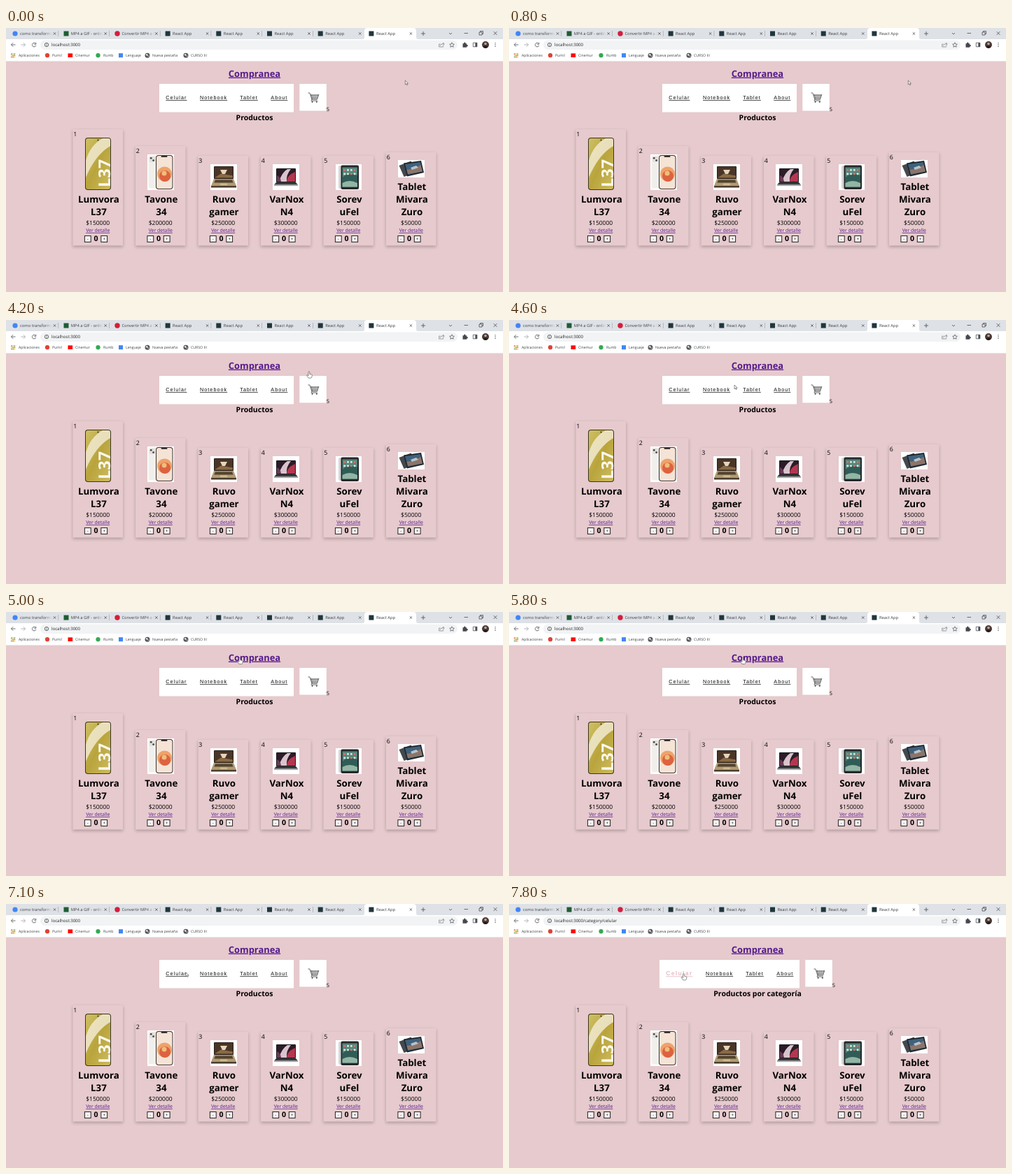
Write an HTML page that moves like this. It is 710x378 px and loops after 8000 ms.

```html
<!DOCTYPE html>
<html lang="es">
<head>
<meta charset="utf-8">
<title>Tienda</title>
<style>
  html, body { margin: 0; width: 100%; height: 100%; overflow: hidden; background: #e6cacd; }
  svg { display: block; width: 710px; height: 378px; text-rendering: geometricPrecision; }
  text { font-family: "Open Sans", "Noto Sans", sans-serif; white-space: pre; }
  .mid { text-anchor: middle; }
  .bold { font-weight: 700; }
  .link { fill: #551a8b; text-decoration: underline; }
  .link.active { fill: #e00; }
  .nav { font: 7.2px "Liberation Sans", Arial, sans-serif; letter-spacing: .146em; text-decoration: underline; }
  .nav.hover { font-size: 8.64px; font-weight: 700; fill: #e6bcc4; }
  .card { fill: #e6cacd; filter: drop-shadow(0 2px 2px rgba(0, 0, 0, .24)); }
  .line { fill: none; stroke: #4a4d51; stroke-width: .8; }
</style>
</head>
<body>
<svg id="stage" viewBox="0 0 710 378" xmlns="http://www.w3.org/2000/svg"></svg>
<script>
const LOOP = 8000;
const text = (x, y, size, s, attrs = '') => `<text x="${x}" y="${y}" font-size="${size}" ${attrs}>${s}</text>`;
const rect = (x, y, w, h, fill, attrs = '') => `<rect x="${x}" y="${y}" width="${w}" height="${h}" fill="${fill}" ${attrs}/>`;
const dot = (x, y, r, fill) => `<circle cx="${x}" cy="${y}" r="${r}" fill="${fill}"/>`;
const path = (d, attrs = 'class="line"') => `<path d="${d}" ${attrs}/>`;
const fill = c => `fill="${c}"`;
const square = (x, y, c) => rect(x - 3.5, y - 3.5, 7, 7, c);
const cross = (x, y, r) => path(`M${x - r} ${y - r}l${2 * r} ${2 * r}m0 ${-2 * r}l${-2 * r} ${2 * r}`);

// Browser window
function tabs() {
  const names = ['como transforma', 'MP4 a GIF - onlin', 'Convertir MP4 a G', ...Array(5).fill('React App')];
  const icons = [dot(13, 8, 3.6, '#4285f4'), square(86, 8, '#1f5c33'), dot(159, 8, 3.7, '#d21f3c')];
  let out = rect(0, 0, 710, 16, '#dee1e6') +
    path('M509 16q3 0 3-3V4q0-4 4-4H582q4 0 4 4v9q0 3 3 3z', fill('#fff'));
  names.forEach((name, i) => {
    const x = 13 + i * 72.7;
    out += (icons[i] || square(x, 8, '#20363b')) +
      text(x + 7, 10, 5.8, name, fill('#3c4043'));
    if (i < 3) out += rect(x + 42, 2, 11, 12, 'url(#fade)') + rect(x + 53, 2, 5, 12, '#dee1e6');
    out += cross(x + 56.5, 8, 1.7);
    if (i < 6) out += rect(x + 61.5, 4, .6, 8, '#9a9da2');
  });
  return out + path('M593 8h6m-3-3v6') + path('M633 7l2 2 2-2') +
    path('M654.5 7.5h5.5') + path('M676 6h4v4h-4zM677.5 6V4.5h4v4H680') + cross(699, 7.5, 2.4);
}

function toolbar() {
  return rect(0, 16, 710, 31.5, '#fff') + rect(49, 17.5, 596, 13.5, '#f1f3f4', 'rx="6.7"') +
    path('M13.5 24H7.5m2.7-2.8L7.4 24l2.8 2.8') +
    path('M21.5 24h6m-2.7-2.8 2.8 2.8-2.8 2.8', 'fill="none" stroke="#a9acb0" stroke-width=".9"') +
    path('M42.2 22.2A2.8 2.8 0 1 0 42.8 25m0-4.2v2.5h-2.5') +
    `<circle cx="58" cy="24" r="2.7" class="line"/>` + path('M58 23.6v2M58 22.2v.7') +
    '<text id="url" x="65" y="26.2" font-size="6.1" fill="#202124"></text>' +
    path('M620.5 23h-1.8v4h6v-1.2M620.3 25.5q.6-3 4.2-3v-1.5l1.8 2-1.8 2v-1.3', 'fill="none" stroke="#74777b" stroke-width=".7"') +
    path('M637 20.8l1 2.2 2.4.3-1.8 1.6.5 2.4-2.1-1.2-2.1 1.2.5-2.4-1.8-1.6 2.4-.3z', 'fill="none" stroke="#4a4d51" stroke-width=".7"') +
    path('M652.5 22.3h1.7a1.2 1.2 0 1 1 2.2 0h1.7v1.8a1.2 1.2 0 1 1 0 2.2v1.4h-5.6z', fill('#45484c')) +
    path('M667.3 21.2h5.6v5.6h-5.6z') + rect(670.4, 21.2, 2.5, 5.6, '#45484c') +
    dot(685, 24, 5, '#4a3a36') + dot(685, 22.6, 1.8, '#c5a193') + path('M681.7 27.6a3.4 3 0 0 1 6.6 0a5 5 0 0 1-6.6 0z', fill('#1d1b20')) +
    [21.6, 24, 26.4].map(y => dot(699, y, .7, '#4a4d51')).join('');
}

function bookmarks() {
  const globe = x => dot(x, 39.2, 3.5, '#54585d') +
    path(`M${x - 2.5} 38.2q2-2.6 3 0t-1.2 1.5zM${x + .6} 41.2l1.8-2 .1 1.6z`, fill('#e4e6e8'));
  const colours = ['#ea4335', '#fbbc04', '#34a853'];
  let out = '';
  for (let i = 0; i < 9; i++)
    out += rect(7.2 + i % 3 * 2.2, 36.4 + (i / 3 | 0) * 2.2, 1.5, 1.5, colours[(i + (i / 3 | 0)) % 3]);
  out += dot(59, 39.2, 3.1, '#db4437') + rect(88.5, 36.4, 6.6, 5.6, '#f00') + dot(131.5, 39.2, 3.1, '#34a853') +
    rect(161, 36.2, 6, 6, '#4285f4') + globe(202) + globe(257);
  const labels = [[18, 'Aplicaciones'], [66, 'Pumil'], [99, 'Cinemur'], [139, 'Rumb'], [171, 'Lenguaje'],
    [209, 'Nueva pestaña'], [264, 'CURSO III']];
  return out + labels.map(([x, s]) => text(x, 41.2, 5.2, s, fill('#3c4043'))).join('');
}

// Product pictures, one per card
const pictures = [
  () => rect(113, 157, 37, 75, '#3a3522', 'rx="4"') + rect(114, 158, 35, 73, 'url(#gold)', 'rx="3.2"') +
    path('M114 190q6-22 24-32h8q3 0 3 3v8q-21 12-35 45z', 'fill="#f1ead0" opacity=".85"') +
    dot(131.5, 160.6, 1, '#222') +
    text(0, 0, 23.5, 'L37', 'class="bold" fill="#fbf8ec" transform="translate(149 228) rotate(-90)"'),
  () => rect(202, 181, 38, 51, '#fff') + rect(203.5, 182.5, 17, 47, '#f1efec', 'rx="3"') +
    rect(205, 184, 8, 8, '#e2dfdb', 'rx="2"') + dot(207.2, 186.3, 1.4, '#444') + dot(210.6, 189.6, 1.4, '#444') +
    rect(214, 182, 24.5, 49, '#3a3532', 'rx="4"') + rect(215, 183, 22.5, 47, '#f5e3d6', 'rx="3.2"') +
    dot(226.5, 209, 10.5, '#eda36a') + dot(227, 212, 8, '#dd6240') + dot(226, 208, 3.5, '#f0bd79') +
    rect(221.5, 183, 9, 2, '#3a3532', 'rx="1"'),
  () => rect(292, 195, 38, 37, '#fff') + rect(297, 198, 28, 18, '#2b211b', 'rx="1"') +
    rect(298, 199, 26, 15.5, '#4a3527') + path('M298 214.5l9-6 17 3v3z', fill('#8a6a45')) +
    path('M306 203h10l-3 6h-4z', fill('#e4d6bd')) +
    path('M297 216h28l4 10H293z', fill('#b29a72')) + path('M299 217.5h24l1.6 4h-27.2z', fill('#51432f')) +
    path('M293 226h36v2.5h-36z', fill('#4b3d2d')) + rect(306, 222.5, 10, 2.5, '#cdb98f'),
  () => rect(381, 195, 38, 37, '#fff') + rect(386, 201, 28, 20, '#1b181c', 'rx="1"') +
    rect(387, 202, 26, 18, '#2b1c28') + path('M390 220q4-13 12-18h5q-7 8-6 18z', fill('#d9c3cd')) +
    path('M401 220q0-9 12-14v14z', fill('#b5364f')) + path('M387 220v-9q5 2 6 9z', fill('#6c3a58')) +
    path('M386 221h28l3 3.5h-34z', fill('#3a383b')) + rect(383, 224.5, 34, 1.6, '#a5a5a9'),
  () => rect(471, 195, 37, 37, '#fff') + rect(475, 197, 12, 33, '#d6d6d9', 'rx="2"') +
    rect(478.5, 196.5, 25.5, 34.5, '#25282b', 'rx="2"') +
    rect(480.5, 199.5, 21.5, 28, '#56857c') + path('M480.5 214q9-8 21.5-3v16.5h-21.5z', fill('#2f5c56')) +
    path('M480.5 222q10-6 21.5 0v5.5h-21.5z', fill('#93b5a4')) +
    [0, 1, 2, 3, 4, 5, 6, 7].map(i => rect(482.3 + i % 4 * 4.8, 202 + (i / 4 | 0) * 5.5, 2.8, 2.8, i % 3 ? '#d8e6e0' : '#d47758', 'rx=".7"')).join(''),
  () => rect(560, 189, 38, 25, '#fff') + path('M561.5 197l17-6.5 8 16.5-18 6z', fill('#44484e')) +
    path('M568 193.5l25-3.5 4 17-24 5.5z', fill('#202429')) +
    path('M570 195l21.8-3 3.2 13.6-20.8 4.7z', fill('#40617c')) + path('M574 209l-1.5-6q11-1 20-7l2.3 9.4z', fill('#8d7468')) +
    path('M578 200l8-3 3 3-9 3z', fill('#b6c4cc'))
];

const products = [
  [145, 150000, 'Lumvora', 'L37'], [169, 200000, 'Tavone', '34'], [183, 250000, 'Ruvo', 'gamer'],
  [183, 300000, 'VarNox', 'N4'], [183, 150000, 'Sorev', 'uFel'], [178, 50000, 'Tablet', 'Mivara', 'Zuro']
];

function button(x, sign) {
  return rect(x - 4.4, 297.6, 8.8, 8.8, '#f8f4f4', 'stroke="#222" stroke-width="1"') +
    text(x, 304, 6, sign, 'class="mid"');
}

function card([top, price, ...name], i) {
  const x = 95.5 + i * 89.5, c = x + 35.7;
  return rect(x, top, 71.5, 311.5 - top, '', 'class="card"') +
    text(x + .8, top + 9.7, 8.8, i + 1) + pictures[i]() +
    name.map((s, n) => text(c + 1.2, 268.4 - (name.length - 1 - n) * 18.4, 13.3, s, 'class="mid bold"')).join('') +
    text(c, 281.7, 8.5, '$' + price, 'class="mid"') +
    text(c, 292, 6.9, 'Ver detalle', 'class="mid link"') +
    button(c - 14.4, '-') + text(c - 2.6, 305.4, 10.5, 0, 'class="mid bold"') + button(c + 9, '+');
}

function header() {
  const cart = path('M434.6 95h12l-2.4 6.8h-7.6z', fill('#8b8b8d')) +
    path('M431.5 93h2.4l3 9.2h7.6l2.4-7.2M436.8 102.2l-.8 1.9h9', 'fill="none" stroke="#5c5c5f" stroke-width=".9"') +
    path('M435.5 98.3h10M438.6 95l1 6.8M441.3 95v6.8M444 95l-.8 6.8', 'stroke="#e4e4e4" stroke-width=".5"') +
    dot(437.6, 105.8, 1.1, '#555') + dot(443.8, 105.8, 1.1, '#555');
  return text(355, 69.6, 12.9, 'Compranea', 'id="title" class="mid bold link"') +
    '<rect id="bar" y="80" height="40.5" fill="#fff"/>' +
    text(228.3, 102.4, 7.2, 'Celular', 'id="first" class="nav"') +
    '<g id="rest">' + text(277, 102.4, 7.2, 'Notebook', 'class="nav"') + text(334.3, 102.4, 7.2, 'Tablet', 'class="nav"') +
    text(378.3, 102.4, 7.2, 'About', 'class="nav"') +
    rect(419.3, 80, 38.5, 38.5, '#fff') + cart + text(457.8, 118.6, 7.4, 5) + '</g>' +
    text(355, 132, 10.5, '', 'id="heading" class="mid bold"');
}

const pointer = 'stroke="#444" stroke-width=".6" stroke-linejoin="round" fill="#fff"';
const cursor = '<g id="arrow">' + path('M0 0v5.8l1.4-1.2 1 2 .9-.4-.9-2h1.8z', pointer) + '</g><g id="hand">' +
  path('M-1 .8q.9-1.3 1.8 0v3.2l2.6.6q1 .3 1 1.3l-.6 2.6-.9 1.2H-.9L-3.4 6.2q.1-1.3 1.3-.6l1.1.8z', pointer) + '</g>';

const $ = id => document.getElementById(id);
$('stage').innerHTML =
  `<defs><linearGradient id="fade"><stop stop-color="#dee1e6" stop-opacity="0"/><stop offset="1" stop-color="#dee1e6"/></linearGradient>
  <linearGradient id="gold" x2="1" y2="1"><stop stop-color="#cfc064"/><stop offset=".5" stop-color="#b9a43c"/><stop offset="1" stop-color="#cdbb60"/></linearGradient></defs>` +
  rect(0, 0, 710, 378, '#e6cacd') + tabs() + toolbar() + bookmarks() + header() + products.map(card).join('') + cursor;

// time, x, y of the hot spot, 1 for the hand
const moves = [
  [0, 570.3, 75.2, 0], [3900, 538, 80, 0], [4000, 492, 84, 0], [4100, 456, 81, 0], [4200, 433, 73.4, 1],
  [4400, 404, 84, 0], [4500, 358, 90, 0], [4600, 322, 93, 0], [4700, 307, 89, 0], [4800, 313, 78, 0],
  [4900, 325, 69, 1], [5000, 334, 64.8, 1], [6400, 317.6, 71.2, 1], [6500, 333, 76, 1], [6600, 346, 85, 0],
  [6700, 339, 92, 0], [6800, 316, 94, 0], [6900, 292, 94, 0], [7000, 270, 95, 0], [7100, 257, 98, 0],
  [7200, 249.6, 99.2, 1]
];

function draw(t) {
  const [, x, y, hand] = moves.findLast(m => m[0] <= t);
  for (const [id, on] of [['arrow', !hand], ['hand', hand]]) {
    $(id).setAttribute('transform', `translate(${x} ${y})`);
    $(id).style.display = on ? '' : 'none';
  }
  const category = t >= 7800;
  $('title').classList.toggle('active', t >= 5600 && t < 5800);
  $('url').textContent = 'localhost:3000' + (category ? '/category/celular' : '');
  $('heading').textContent = category ? 'Productos por categoría' : 'Productos';
  $('bar').setAttribute('x', category ? 215 : 219);
  $('bar').setAttribute('width', category ? 200 : 192);
  $('first').setAttribute('x', category ? 224.3 : 228.3);
  $('first').classList.toggle('hover', category);
  $('rest').setAttribute('transform', `translate(${category ? 4 : 0} 0)`);
}

function tick() {
  draw(performance.now() % LOOP);
  requestAnimationFrame(tick);
}
tick();
</script>
</body>
</html>
```
